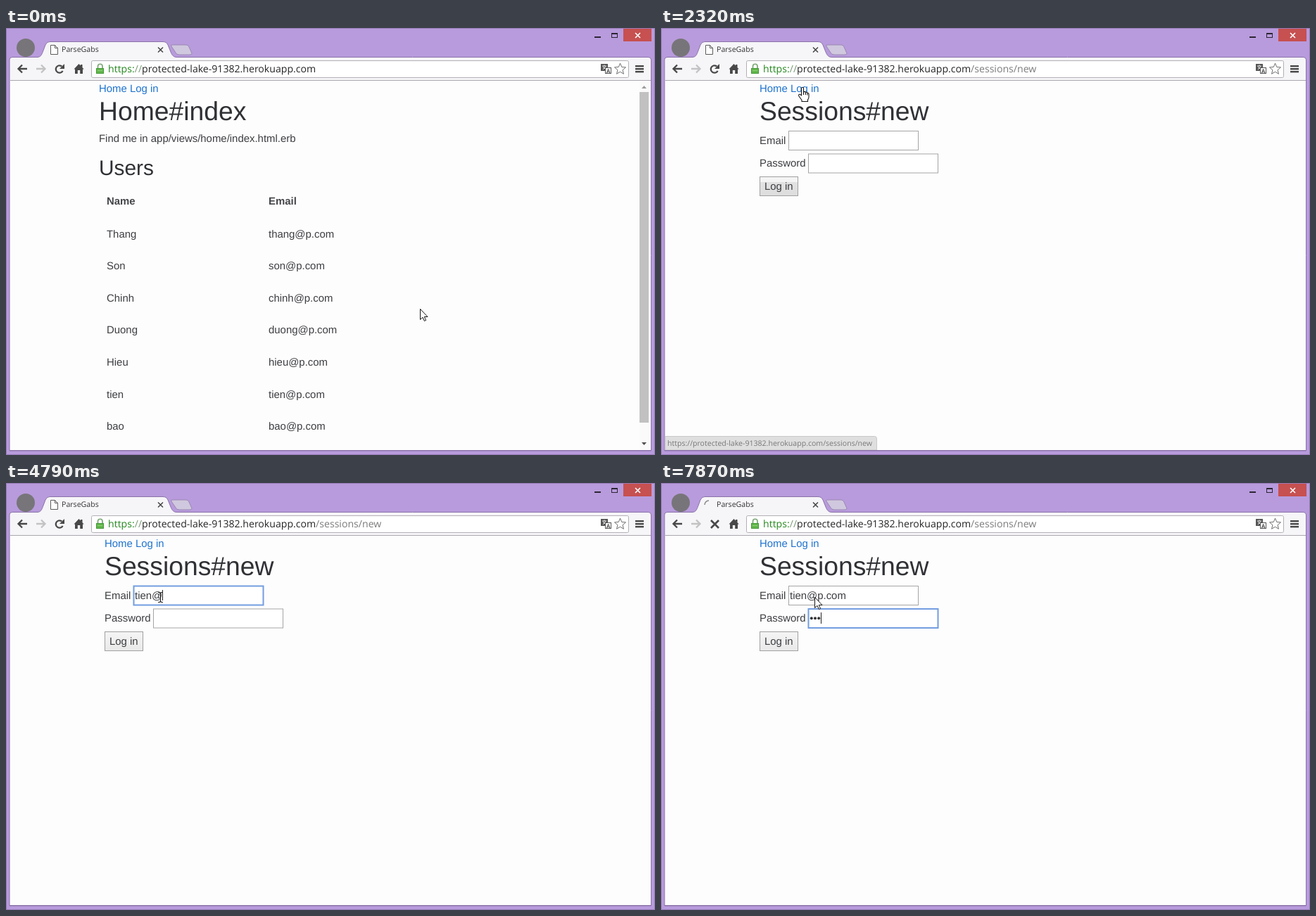
An HTML page with a canvas for the animation above (8000 ms loop, 922 px wide and 607 px high).

```html
<!DOCTYPE html>
<html lang="en">
<head>
<meta charset="utf-8">
<title>Log in demo</title>
<style>
html, body { margin: 0; width: 100%; height: 100%; overflow: hidden; background: #b89bdc; }
canvas { display: block; }
</style>
</head>
<body>
<canvas id="stage" width="922" height="607"></canvas>
<script>
const ctx = document.getElementById('stage').getContext('2d');
ctx.textRendering = 'geometricPrecision';

const LOOP = 8000;
const PAGE_FONT = '"Liberation Sans", Arial, sans-serif';
const UI_FONT = '"Open Sans", "Noto Sans", sans-serif';
const BODY = 14.93, INK = '#3d3e42', LINK = '#1f74cf', DARK = '#484848';
const HOST = 'protected-lake-91382.herokuapp.com', PATH = '/sessions/new';
const USERS = ['Thang', 'Son', 'Chinh', 'Duong', 'Hieu', 'tien', 'bao'];
const DOMAIN = '@p.com';

// [start time, value] lists; the last started entry is the current one
const POINTER = [
  [0, ['arrow', 588, 399]], [570, ['arrow', 533, 392]], [700, ['arrow', 304, 178]],
  [830, ['arrow', 262, 135]], [970, ['arrow', 222, 96]], [1100, ['arrow', 204, 76]],
  [1240, ['hand', 202, 80]], [1520, ['hand', 201, 84]],
  [2590, ['arrow', 206, 100]], [2720, ['arrow', 211, 124]], [2860, ['arrow', 215, 140]],
  [2990, ['beam', 218, 155]], [3130, ['beam', 219, 160]], [3280, ['beam', 219, 162]],
  [7380, ['arrow', 218, 162]]
];
const EMAIL = [
  [0, ''], [3810, 't'], [3960, 'ti'], [4090, 'tie'], [4230, 'tien'], [4790, 'tien@'],
  [5070, 'tien@p'], [5600, 'tien@p.'], [5870, 'tien@p.c'], [6000, 'tien@p.co'], [6120, 'tien@p.com']
];
const DOTS = [[0, 0], [6830, 1], [6960, 2], [7100, 3]];
const SPIN = [[7380, 3], [7530, 2.2], [7700, 1.5], [7870, 1]];
const REVEAL = [[570, [533, 392, 67, 24]], [700, [304, 178, 241, 232]], [1650, [6, 84, 302, 516]]];

function at(list, t) {
  let value = list[0][1];
  for (const [start, v] of list) if (t >= start) value = v;
  return value;
}

function rect(x, y, w, h, color) {
  ctx.fillStyle = color;
  ctx.fillRect(x, y, w, h);
}

function frame(x, y, w, h, color, width = 1) {
  ctx.strokeStyle = color;
  ctx.lineWidth = width;
  ctx.strokeRect(x + width / 2, y + width / 2, w - width, h - width);
}

function text(str, x, y, size, color, font = PAGE_FONT, weight = '') {
  ctx.font = `${weight} ${size}px ${font}`;
  ctx.fillStyle = color;
  ctx.fillText(str, x, y);
  return x + ctx.measureText(str).width;
}

function shape(d, fill, stroke, width = 1, x = 0, y = 0) {
  const p = new Path2D(d);
  ctx.save();
  ctx.translate(x, y);
  if (fill) { ctx.fillStyle = fill; ctx.fill(p); }
  if (stroke) { ctx.strokeStyle = stroke; ctx.lineWidth = width; ctx.stroke(p); }
  ctx.restore();
}

function arc(x, y, r, from, to, color, width) {
  ctx.beginPath();
  ctx.arc(x, y, r, from, to);
  ctx.strokeStyle = color;
  ctx.lineWidth = width;
  ctx.stroke();
}

function disc(x, y, r, color) {
  ctx.beginPath();
  ctx.arc(x, y, r, 0, 7);
  ctx.fillStyle = color;
  ctx.fill();
}

function star(x, y, r) {
  let d = '';
  for (let i = 0; i < 10; i++) {
    const a = i * Math.PI / 5 - Math.PI / 2, q = i % 2 ? r * 0.45 : r;
    d += `${i ? 'L' : 'M'}${x + q * Math.cos(a)} ${y + q * Math.sin(a)}`;
  }
  shape(d + 'Z', '#fff', '#6e6e6e', 1);
}

function drawWindow() {
  rect(0, 0, 922, 607, '#b89bdc');
  frame(0, 0, 922, 607, '#9579b6');
  rect(836, 12, 9, 2, '#2c2633');
  frame(860, 7, 9, 7, '#2c2633');
  rect(860, 7, 9, 2, '#2c2633');
  rect(877, 1, 40, 18, '#c75050');
  shape('M894 7L901 14M901 7L894 14', null, '#fff', 1.6);
  disc(28, 28, 13, '#777579');

  shape('M236 24H256Q259 24 260 27L264 36Q264 38 261 38H246Q242 38 241 35L235 26Q234 24 236 24Z', '#d0c8de', '#9a88b4');
  shape('M5 601V45Q5 41.5 9 41.5H44C50 41.5 51 37 53 32L56 24Q58 19.5 62 19.5H223Q228 19.5 230 24L234 34C236 39 238 41.5 243 41.5H912Q916.5 41.5 916.5 46V601Z', '#f6f5f8', '#8a72a9');
  rect(6, 75, 910, 525, '#fdfdfd');
  rect(6, 74, 910, 1, '#aaa6af');
  rect(5, 600, 912, 1, '#8a72a9');
}

function drawTab(t) {
  if (t < 7380) {
    shape('M63.5 24.5H69.5L73.5 28.5V37.5H63.5ZM69.5 24.5V28.5H73.5', '#fff', '#5c5c5c');
  } else {
    const a = at(SPIN, t) * Math.PI;
    arc(68, 31, 6, a, a + Math.PI / 2, '#8b8b8b', 1.6);
  }
  text('ParseGabs', 79, 34, 10.6, '#333', UI_FONT);
  shape('M216 27.5L223 34.5M223 27.5L216 34.5', null, '#444', 1.5);
}

function drawToolbar(t) {
  const arrow = 'M7 -5.5L1.5 0L7 5.5M2 0H14';
  shape(arrow, null, DARK, 2.3, 16, 58);
  ctx.save();
  ctx.translate(57, 58);
  ctx.scale(-1, 1);
  shape(arrow, null, '#c3c3c3', 2.3);
  ctx.restore();

  if (t < 7380) {
    arc(76, 58.5, 5.2, 0.5, 5.4, DARK, 2.3);
    shape('M83 51V58H76Z', DARK);
  } else {
    shape('M71 53L82 64M82 53L71 64', null, DARK, 2.7);
  }
  shape('M96.5 58.5L103.5 51L106 53.6V52H108.5V56.2L110.8 58.5H109V65H105.2V60H101.8V65H98V58.5Z', DARK);

  ctx.beginPath();
  ctx.roundRect(121.5, 46.5, 763, 24, 2);
  ctx.fillStyle = '#fff';
  ctx.fill();
  ctx.strokeStyle = '#b2afb6';
  ctx.lineWidth = 1;
  ctx.stroke();

  shape('M130.5 58V54.5A3.2 3.2 0 0 1 137 54.5V58', null, '#7aa775', 1.7);
  rect(128, 57, 11, 8, '#62b64c');
  frame(128, 57, 11, 8, '#459838');
  rect(130, 60, 7, 1, '#8fd17a');

  let x = text('https:', 145, 63, 14.1, '#25881f', UI_FONT);
  x = text('//', x, 63, 14.1, '#7d9a78', UI_FONT);
  x = text(HOST, x, 63, 14.1, '#252525', UI_FONT);
  if (t >= 2320) text(PATH, x, 63, 14.1, '#7c7c7c', UI_FONT);

  rect(845, 51, 10, 10, '#555');
  shape('M847 54H853M850 52.5V54M848 59L852 54.5M848 55L852 59', null, '#fff', 0.9);
  rect(851, 56, 9, 9, '#fff');
  frame(851, 56, 9, 9, '#555');
  text('A', 852.8, 63.6, 8, '#444', PAGE_FONT, 'bold');
  star(872.5, 58.5, 8.4);
  for (const y of [53, 57, 61]) rect(894, y, 12, 2.4, DARK);
}

function drawNav(x, hover) {
  text('Home', x, 91, BODY, LINK);
  const start = x + 44, color = hover ? '#123f72' : LINK;
  const end = text('Log in', start, 91, BODY, color);
  if (hover) rect(start, 92.5, end - start, 1, color);
}

function drawTableLines(t) {
  ctx.save();
  ctx.beginPath();
  for (const [start, box] of REVEAL) if (t >= start) ctx.rect(...box);
  ctx.clip();
  rect(132, 223, 660, 47, '#ecedf0');
  for (let i = 0; i < 7; i++) rect(132, Math.round(315 + i * 45.6), 660, 1, '#e5e6e9');
  ctx.restore();
}

function drawHome(t) {
  drawNav(132, t >= 1240);
  text('Home#index', 132, 131, 37.3, '#303135');
  text('Find me in app/views/home/index.html.erb', 132, 162, BODY, INK);
  text('Users', 132, 209, 29.85, '#303135');
  drawTableLines(t);
  text('Name', 143, 251, BODY, '#45464a', PAGE_FONT, 'bold');
  text('Email', 373, 251, BODY, '#45464a', PAGE_FONT, 'bold');
  USERS.forEach((name, i) => {
    const y = 297.5 + i * 45.6;
    text(name, 143, y, BODY, INK);
    text(name.toLowerCase() + DOMAIN, 373, y, BODY, INK);
  });
  rect(900, 76, 14, 524, '#fafafa');
  rect(900, 91, 13, 470, '#c1c1c1');
  shape('M903 86L906.5 82L910 86Z', '#9b9b9b');
  shape('M903 589L906.5 593L910 589Z', '#505050');
}

function drawField(x, y, focus) {
  rect(x, y, 185, 28, '#fff');
  if (focus) frame(x - 0.5, y - 0.5, 186, 29, '#739de0', 2);
  else frame(x, y, 185, 28, '#a5a5a5');
}

function drawForm(t) {
  const onEmail = t >= 3420 && t < 6280, onPass = t >= 6280;
  drawNav(140, false);
  text('Sessions#new', 140, 131, 37.3, '#303135');
  text('Email', 140, 164.5, BODY, INK);
  text('Password', 140, 197, BODY, INK);
  drawField(181, 146, onEmail);
  drawField(209, 178.5, onPass);

  const end = text(at(EMAIL, t), 183, 164.5, BODY, INK);
  if (onEmail) rect(Math.round(end), 152, 1, 15, '#222');
  const dots = at(DOTS, t);
  for (let i = 0; i < dots; i++) disc(213.8 + i * 5.2, 192.3, 2, '#333');
  if (onPass) rect(Math.round(211 + dots * 5.3), 184, 1, 16, '#222');

  const face = ctx.createLinearGradient(0, 211, 0, 239);
  const early = t < 2450;
  face.addColorStop(0, '#f4f4f4');
  face.addColorStop(0.29, early ? '#f4f4f4' : '#f2f2f2');
  face.addColorStop(0.3, early ? '#e2e2e2' : '#f1f1f1');
  face.addColorStop(1, early ? '#dddddd' : '#e9e9e9');
  rect(140, 211, 55, 28, face);
  frame(140, 211, 55, 28, '#a0a0a0');
  text('Log in', 147, 230, BODY, INK);

  if (t >= 3810 && t < 3960) {
    rect(180, 174, 186, 46, '#fff');
    frame(180, 174, 186, 46, '#bcbcbc');
    rect(181, 173.5, 185, 1.5, '#739de0');
    text('thang' + DOMAIN, 184, 190, 10.65, '#2c2c2c', UI_FONT);
    text('thang@example', 184, 212, 10.65, '#2c2c2c', UI_FONT);
  }
}

function drawStatus(t) {
  if (t < 1650 || t >= 2720) return;
  ctx.globalAlpha = t < 1790 || t >= 2590 ? 0.6 : 1;
  shape('M6 600V580.5H303.5Q306.5 580.5 306.5 583.5V600Z', '#dfdfdf', '#c9c9c9');
  text('https://' + HOST + PATH, 9, 594, 10.57, '#777', UI_FONT);
  ctx.globalAlpha = 1;
}

function drawPointer(t) {
  const [kind, x, y] = at(POINTER, t);
  ctx.lineJoin = 'round';
  if (kind === 'arrow') {
    shape('M.5 .5V15.5L4 12.3L6.4 17.5L8.6 16.5L6.3 11.5H11Z', '#fff', '#161616', 1, x, y);
  } else if (kind === 'hand') {
    shape('M-1.5 12V2Q-1.5 .3 0 .3T1.5 2V7Q4 5.6 4.4 7.6Q6.6 6.6 7 8.6Q9 8 9 10V14Q9 16.5 7.5 18V20.5H-1V18.5L-5 13Q-6 11 -4.5 10.3Q-3 10 -1.5 12ZM1.5 7V11M4.4 7.6V11M7 8.6V11.5',
      '#fff', '#161616', 1.1, x, y);
  } else {
    shape('M-3 -6.5H-1L.5 -5.5L2 -6.5H4M.5 -5.5V6.5M-3 7.5H-1L.5 6.5L2 7.5H4', null, '#222', 1.2, x, y);
  }
  ctx.lineJoin = 'miter';
}

function draw(now) {
  const t = now % LOOP;
  drawWindow();
  drawTab(t);
  drawToolbar(t);
  ctx.save();
  ctx.beginPath();
  ctx.rect(6, 75, 910, 525);
  ctx.clip();
  if (t < 2320) drawHome(t);
  else drawForm(t);
  drawStatus(t);
  ctx.restore();
  drawPointer(t);
  requestAnimationFrame(draw);
}
draw(performance.now());
</script>
</body>
</html>
```
